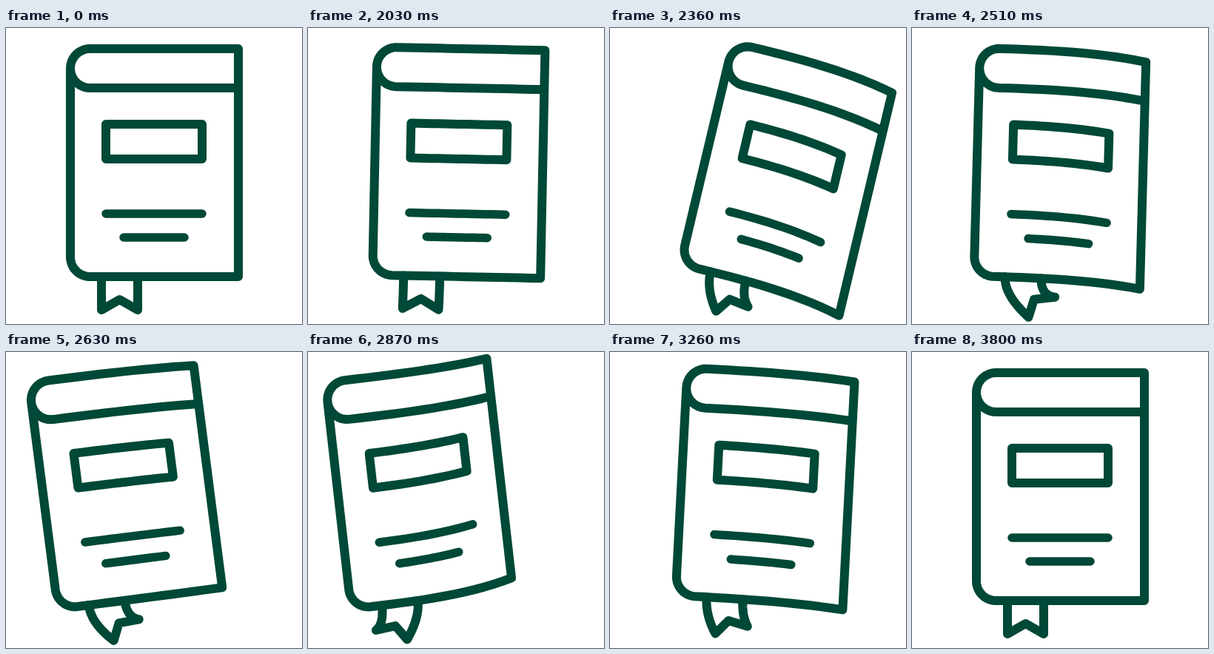
An HTML page with a canvas that plays this animation: 400x400 px, repeating every 3830 ms.

```html
<!DOCTYPE html>
<html lang="en">
<head>
<meta charset="utf-8">
<title>Book</title>
<style>
  html, body { margin: 0; width: 100%; height: 100%; overflow: hidden; background: #fff; }
  canvas { display: block; width: 400px; height: 400px; }
</style>
</head>
<body>
<canvas id="stage" width="400" height="400"></canvas>
<script>
const ctx = document.getElementById('stage').getContext('2d');
const LOOP = 3830, START = 2030, STEP = 30;
const PIVOT = { x: 160, y: 345 };
const LEFT = 87, RIGHT = 314, TOP = 28, MID = 81, BOTTOM = 336;
const R = (MID - TOP) / 2;
const INNER_GAIN = 1.45;

// Glides from one turning point [time, value] to the next in half sine waves
const swing = (...turns) => t => {
  const i = turns.findIndex(([time]) => time > t);
  if (i < 0) return turns[turns.length - 1][1];
  if (i === 0) return turns[0][1];
  const [t0, v0] = turns[i - 1], [t1, v1] = turns[i];
  return v0 + (v1 - v0) * (1 - Math.cos(Math.PI * (t - t0) / (t1 - t0))) / 2;
};

// The sway dies away; slide, bend and ribbon trail behind the tilt
const tilt = swing([1975, 0], [2285, 15.3], [2700, -9], [3260, 3], [3640, 0]);
const slide = swing([2030, 0], [2360, 4], [2830, -29], [3230, 1], [3500, 0]);
const drop = swing([1975, -1], [2285, 0], [2850, 3], [3260, -3.3], [3640, 0]);
const bend = swing([2030, 0], [2380, 17], [2880, -12.5], [3270, 7.5], [3620, 0]);
const flutter = swing([2000, 0], [2100, -4], [2550, 34], [2910, -22], [3290, 15], [3700, 0]);

// Maps a point of the upright book to the stage
function makeWarp(t) {
  const angle = tilt(t) * Math.PI / 180, cos = Math.cos(angle), sin = Math.sin(angle);
  const dx = slide(t), dy = drop(t), curl = bend(t);
  const squeeze = curl * curl / 90 - 0.18 * dx;
  return (x, y, gain) => {
    const u = (x - LEFT) / (RIGHT - LEFT);
    const v = (y - TOP) / (BOTTOM - TOP);
    const sag = (curl + 0.34 * dx * (v - 0.5)) * gain;
    const px = x - squeeze * u ** 6 - PIVOT.x;
    const py = y + sag * u ** 3 - PIVOT.y;
    return [PIVOT.x + dx + px * cos - py * sin, PIVOT.y + dy + px * sin + py * cos];
  };
}

const sample = (n, point) => Array.from({ length: n + 1 }, (_, i) => point(i / n));

// Splits each edge so that straight lines can bend
const polyline = (...points) => points.slice(1).flatMap(([bx, by], i) => {
  const [ax, ay] = points[i];
  return sample(14, p => [ax + (bx - ax) * p, ay + (by - ay) * p]);
});

const arc = (cx, cy, from, to) => sample(24, p => {
  const a = (from + (to - from) * p) * Math.PI / 180;
  return [cx + R * Math.cos(a), cy + R * Math.sin(a)];
});

const curve = (a, c, b) => sample(16, p => {
  const q = 1 - p;
  return [0, 1].map(n => q * q * a[n] + 2 * p * q * c[n] + p * p * b[n]);
});

// The leading tail stretches down while the other one curls up
function ribbon(s) {
  const size = Math.abs(s);
  const tail = (x, leads) => leads
    ? [x + s, 381 + 0.25 * size]
    : [x + 0.58 * s, 381 - 0.62 * size];
  return [
    ...curve([129, BOTTOM], [129, 361], tail(129, s >= 0)),
    [153.5 + 0.47 * s, 367 - 0.06 * size],
    ...curve(tail(178, s < 0), [178, 359], [178, BOTTOM])
  ];
}

const cover = [
  ...polyline([RIGHT, MID], [LEFT + R, MID]),
  ...arc(LEFT + R, TOP + R, 90, 270),
  ...polyline([LEFT + R, TOP], [RIGHT, TOP], [RIGHT, BOTTOM], [LEFT + R, BOTTOM]),
  ...arc(LEFT + R, BOTTOM - R, 90, 180),
  [LEFT, TOP + R]
];
const label = polyline([135, 130], [265, 130], [265, 177], [135, 177], [135, 130]);
const longLine = polyline([135, 251], [265, 251]);
const shortLine = polyline([159, 283], [241, 283]);

function draw(t) {
  const warp = makeWarp(t);
  const stroke = (points, width = 12, gain = 1) => {
    ctx.lineWidth = width;
    ctx.beginPath();
    points.forEach(([x, y]) => ctx.lineTo(...warp(x, y, gain)));
    ctx.stroke();
  };
  ctx.fillStyle = '#fff';
  ctx.fillRect(0, 0, 400, 400);
  ctx.strokeStyle = '#004837';
  ctx.lineCap = ctx.lineJoin = 'round';
  stroke(ribbon(flutter(t)));
  stroke(cover);
  stroke(label, 12, INNER_GAIN);
  stroke(longLine, 11.5, INNER_GAIN);
  stroke(shortLine, 11.5, INNER_GAIN);
}

const begin = performance.now();
function tick() {
  const t = (performance.now() - begin) % LOOP;
  // The book rests until START, which looks the same as the end of the loop
  draw(t < START ? LOOP : START + Math.floor((t - START) / STEP) * STEP);
  requestAnimationFrame(tick);
}
tick();
</script>
</body>
</html>
```
